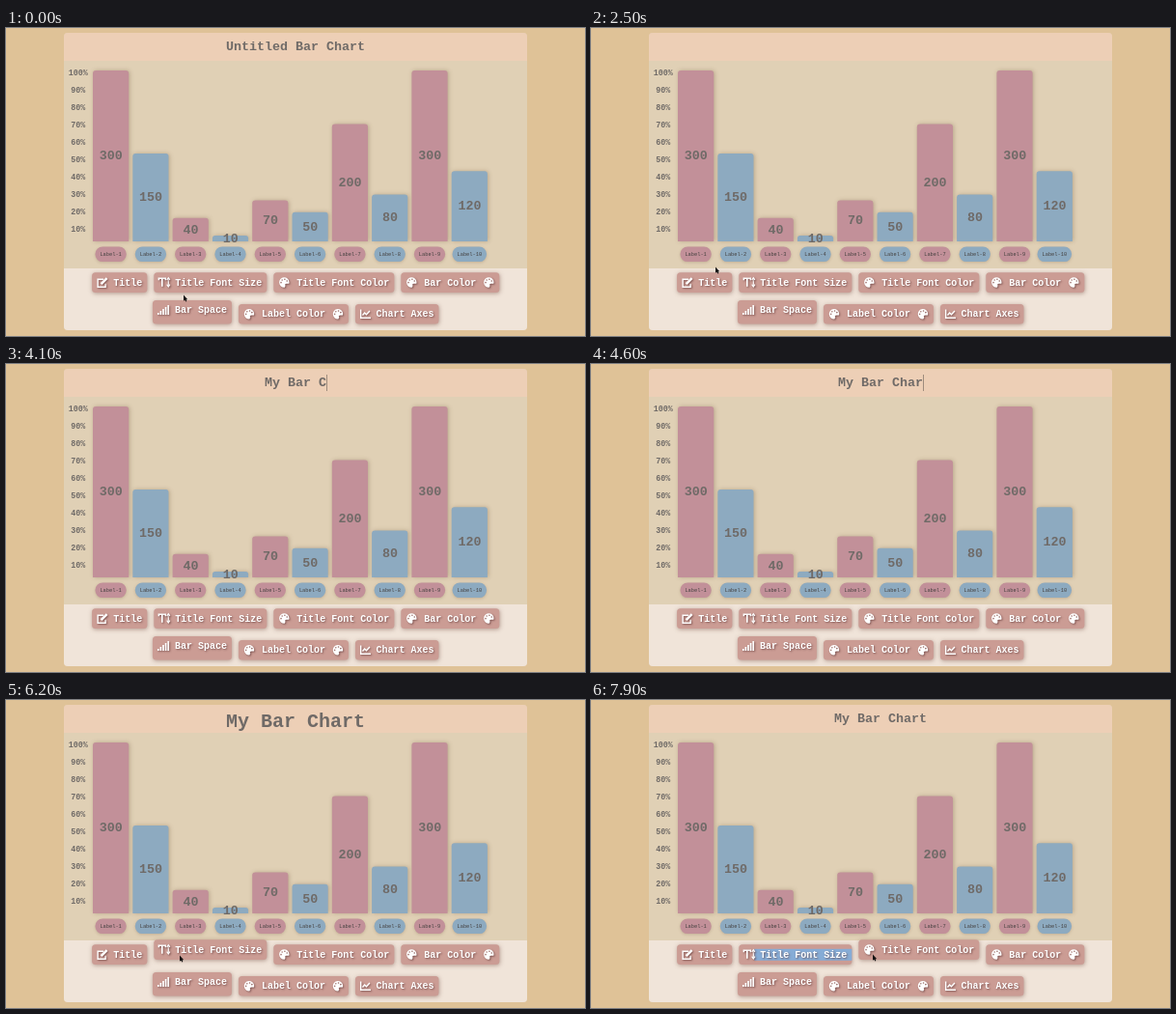
Recreate the animation shown at these times as an HTML page with a canvas. Size 600 by 319 pixels, loop 8 s.

```html
<!DOCTYPE html>
<html lang="en">
<head>
<meta charset="utf-8">
<title>Bar chart editor</title>
<style>
  html, body { margin: 0; width: 100%; height: 100%; overflow: hidden; background: #dfc297; }
  canvas { display: block; }
</style>
</head>
<body>
<canvas id="stage" width="600" height="319"></canvas>
<script>
const ctx = document.getElementById('stage').getContext('2d');
const LOOP = 8000;
const PINK = '#c29099', BLUE = '#8daac0', GREY = '#6f6a67', BUTTON = '#cb9c94';
const values = [300, 150, 40, 10, 70, 50, 200, 80, 300, 120];

const EDIT_START = 1000, TYPE_START = 2700, KEY_TIME = 190, EDIT_END = 5050;
const NEW_TITLE = 'My Bar Chart';
const SIZE_START = 5650, CLICK_TIME = 520, SELECT_START = SIZE_START + 2 * CLICK_TIME;

// Each move starts at the given time and ends at x, y
const MOVE_TIME = 430;
const moves = [
  [-MOVE_TIME, 184, 277], [200, 127, 261], [1250, 129, 248],
  [4650, 129, 256], [5150, 180, 265], [7330, 292, 264]
];

const clamp = (v, max = 1) => Math.max(0, Math.min(max, v));
const ease = v => v * v * (3 - 2 * v);

function shadow(color, blur, dx, dy) {
  Object.assign(ctx, { shadowColor: color, shadowBlur: blur, shadowOffsetX: dx, shadowOffsetY: dy });
}
const noShadow = () => shadow('transparent', 0, 0, 0);

function box(x, y, w, h, radius, color) {
  ctx.fillStyle = color;
  ctx.beginPath();
  ctx.roundRect(x, y, w, h, radius);
  ctx.fill();
}

function write(text, x, y, size, color, align = 'center', weight = 'bold') {
  ctx.font = `${weight} ${size}px "Courier New", "Liberation Mono", monospace`;
  ctx.textAlign = align;
  ctx.fillStyle = color;
  ctx.fillText(text, x, y);
}

function line(width, ...points) {
  ctx.lineWidth = width;
  ctx.beginPath();
  points.forEach(([x, y]) => ctx.lineTo(x, y));
  ctx.stroke();
}

// Icons are 10 high; width is the room they take in a button
const edit = {
  width: 11.2,
  draw() {
    line(1.4, [7, 2], [1, 2], [1, 10], [9, 10], [9, 6.5]);
    line(2.4, [4.5, 6.8], [10.5, 0.8]);
  }
};
const textHeight = {
  width: 11,
  draw() {
    line(1.5, [0, 3], [0, 1], [7, 1], [7, 3]);
    line(1.6, [3.5, 1], [3.5, 9.5]);
    line(1.2, [10, 1], [10, 9]);
    for (const side of [-1, 1]) line(1.2, [8.4, 5 + side * 2.4], [10, 5 + side * 4.6], [11.6, 5 + side * 2.4]);
  }
};
const palette = {
  width: 13,
  draw() {
    ctx.beginPath();
    ctx.arc(6, 5.2, 5.2, 1.5, 6.5);
    ctx.quadraticCurveTo(11, 6.6, 8.5, 6.5);
    ctx.quadraticCurveTo(6, 6.8, 7.3, 8.7);
    for (let i = 0; i < 4; i++) {
      const angle = 3.1 + i * 0.9, x = 6 + 3.3 * Math.cos(angle), y = 5.2 + 3.3 * Math.sin(angle);
      ctx.moveTo(x + 0.8, y);
      ctx.arc(x, y, 0.8, 0, 7);
    }
    ctx.fill('evenodd');
  }
};
const signal = {
  width: 12,
  draw() {
    for (let i = 0; i < 5; i++) ctx.fillRect(i * 2.6, 8 - i * 2, 1.7, 2 + i * 2);
  }
};
const chartLine = {
  width: 10.5,
  draw() {
    line(1.4, [0.7, 0.5], [0.7, 9.3], [11, 9.3]);
    line(1.4, [2.5, 6.5], [4.7, 4], [6.5, 5.7], [10, 2]);
  }
};

// Centred row of buttons, each sized by its text and icons
function layoutRow(y, items) {
  const gap = 7, padding = 5, space = 6;
  const row = items.map(([text, icon, { both = false, tall = 0 } = {}]) => {
    const iconRoom = icon.width + space;
    return {
      text, icon, both, y: y - tall, h: 20.6 + tall, iconRoom, padding,
      w: 2 * padding + text.length * space + iconRoom * (both ? 2 : 1)
    };
  });
  let x = 300.2 - (row.reduce((sum, b) => sum + b.w + gap, -gap)) / 2;
  for (const b of row) {
    b.x = x;
    x += b.w + gap;
  }
  return row;
}
const buttons = [
  ...layoutRow(253.3, [
    ['Title', edit], ['Title Font Size', textHeight],
    ['Title Font Color', palette], ['Bar Color', palette, { both: true }]
  ]),
  ...layoutRow(286, [
    ['Bar Space', signal, { tall: 4 }], ['Label Color', palette, { both: true }], ['Chart Axes', chartLine]
  ])
];

function pointerAt(t) {
  const i = Math.max(0, moves.findLastIndex(([start]) => t >= start));
  const [start, x, y] = moves[i], [, fromX, fromY] = moves[Math.max(0, i - 1)];
  const k = ease(clamp((t - start) / MOVE_TIME));
  return [fromX + (x - fromX) * k, fromY + (y - fromY) * k];
}

function isOver(b, t) {
  const [x, y] = pointerAt(t);
  return x > b.x && x < b.x + b.w && y > b.y && y < b.y + b.h;
}

// The lift follows the share of the last moments spent hovering
function liftAt(b, t) {
  const samples = 30, duration = 180;
  let hits = 0;
  for (let i = 0; i < samples; i++) hits += isOver(b, t - i * duration / samples);
  return 5 * ease(hits / samples);
}

function drawChart() {
  for (let i = 0; i < 10; i++) write(`${100 - i * 10}%`, 74.8, 48.8 + i * 18.05, 8.33, GREY);
  values.forEach((value, i) => {
    const x = 90 + i * 41.3, height = Math.min(177, value * 0.607);
    const color = i % 2 ? BLUE : PINK;
    const label = `Label-${i + 1}`, pill = 9.5 + label.length * 3.25;
    shadow('rgba(110,85,60,.35)', 4, 1, 0);
    box(x, 221 - height, 37.2, height, [3, 3, 0, 0], color);
    shadow('rgba(110,85,60,.25)', 3, 0, 1);
    box(x + 18.6 - pill / 2, 226.5, pill, 15.6, 7.5, color);
    noShadow();
    write(value, x + 18.8, 224.7 - height / 2, 13.33, GREY);
    write(label, x + 18.6, 236, 5.33, '#44403f', 'center', 'normal');
  });
}

function drawButton(b, t) {
  const textX = b.padding + b.iconRoom;
  ctx.save();
  ctx.translate(b.x, b.y - liftAt(b, t));
  shadow('rgba(120,80,70,.5)', 4, 0.5, 1);
  box(0, 0, b.w, b.h, 3.5, BUTTON);
  noShadow();
  if (b.text === 'Title Font Size' && t >= SELECT_START) {
    ctx.fillStyle = '#86acd6';
    ctx.fillRect(textX - 6, 4.5, b.w - textX + 6, 12);
  }
  shadow('rgba(90,50,50,.65)', 2, 1, 1);
  write(b.text, textX, 13.4, 10, '#fff', 'left');
  ctx.strokeStyle = '#fff';
  ctx.translate(b.padding, 5);
  b.icon.draw();
  if (b.both) {
    ctx.translate(b.w - b.padding * 2 - b.icon.width + 1, 0);
    b.icon.draw();
  }
  ctx.restore();
}

function drawTitle(t) {
  // Clicks step through four sizes from 10 to 20 and wrap around
  const clicks = clamp(Math.floor((t - SIZE_START) / CLICK_TIME) + 1, 4);
  const size = 10 * (1 + (clicks + 1) % 4 / 3);
  const typed = Math.max(0, Math.floor((t - TYPE_START) / KEY_TIME) + 1);
  const title = t < EDIT_START ? 'Untitled Bar Chart' : NEW_TITLE.slice(0, typed);
  write(title, 300, 19 + size * 0.33 + Math.max(0, size - 13.33) * 0.4, size, GREY);
  const editing = t >= EDIT_START && t < EDIT_END;
  const blinkOn = t >= TYPE_START || (t - EDIT_START) % 1000 < 500;
  if (editing && blinkOn) {
    ctx.fillStyle = '#8a7b70';
    ctx.fillRect(300 + title.length * 4, 11, 0.8, 17);
  }
}

function drawPointer(t) {
  if (t >= TYPE_START && t < 4650) return;
  ctx.save();
  ctx.translate(...pointerAt(t));
  ctx.fillStyle = ctx.strokeStyle = '#111';
  ctx.beginPath();
  for (const [x, y] of [[0, -0.5], [0, 5.4], [4, 4]]) ctx.lineTo(x, y);
  ctx.fill();
  line(1.1, [1.6, 3.5], [2.8, 6.3]);
  ctx.restore();
}

function draw(now) {
  const t = now % LOOP;
  noShadow();
  ctx.fillStyle = '#dfc297';
  ctx.fillRect(0, 0, 600, 319);
  box(60, 5, 480, 308, 4, '#e0d0b5');
  box(60, 5, 480, 29, [4, 4, 0, 0], '#edcfb6');
  box(60, 249, 480, 64, [0, 0, 4, 4], '#f0e4d9');
  drawChart();
  drawTitle(t);
  buttons.forEach(b => drawButton(b, t));
  drawPointer(t);
  requestAnimationFrame(draw);
}
requestAnimationFrame(draw);
</script>
</body>
</html>
```
